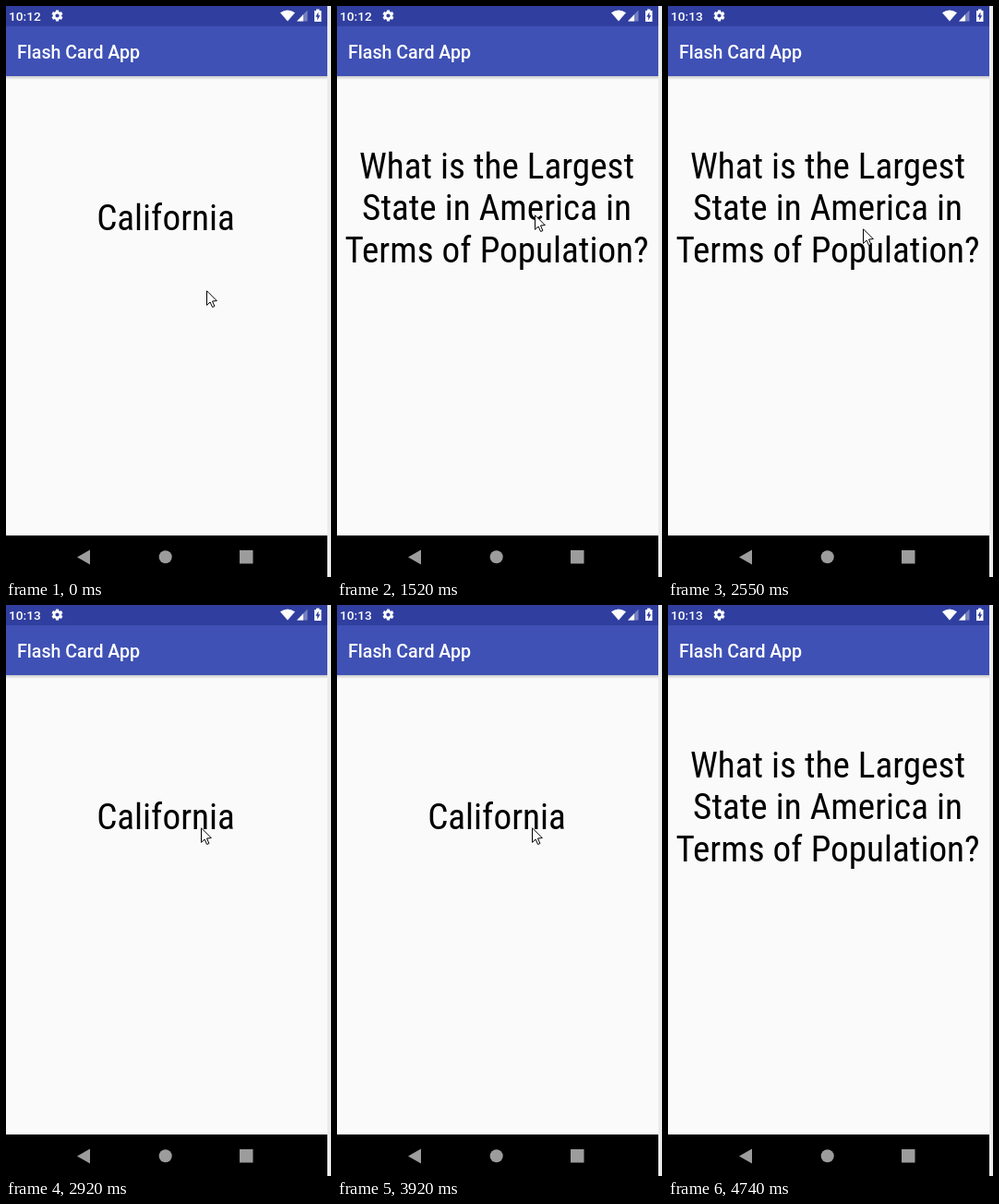
An HTML page with a canvas for the animation above (5150 ms loop, 352x619 px).

```html
<!DOCTYPE html>
<html lang="en">
<head>
<meta charset="utf-8">
<title>Flash cards</title>
<style>
  html, body { margin: 0; width: 100%; height: 100%; overflow: hidden; background: #fafafa; }
  canvas { display: block; width: 352px; height: 619px; }
</style>
</head>
<body>
<canvas id="stage" width="352" height="619"></canvas>
<script>
const ctx = document.getElementById('stage').getContext('2d');
const LOOP = 5150;
const MID = 173;
const FLIPS = [1520, 2100, 2550, 2920, 3170, 3420, 3700, 3920, 4100];
const CLOCK_TICK = 2120;
const QUESTION = ['What is the Largest', 'State in America in', 'Terms of Population?'];
const ANSWER = 'California';
const CARD_FONT = "39.2px 'Roboto Condensed', Roboto, sans-serif";

// Each move runs in equal hops; the first hop lands at `start`, the last at `end`.
const MOVES = [
  { start: 1090, end: 1300, hops: 9, from: [217, 308], bend: [226, 272], to: [214, 226] },
  { start: 1570, end: 1790, hops: 9, from: [214, 226], bend: [214, 234], to: [211, 240] },
  { start: 2300, end: 2300, hops: 1, from: [211, 240], bend: [211, 240], to: [211, 241] },
  { start: 4380, end: 4740, hops: 14, from: [211, 241], bend: [257, 445], to: [303, 650] }
];

function rect(color, x, y, w, h) {
  ctx.fillStyle = color;
  ctx.fillRect(x, y, w, h);
}

function poly(color, points) {
  ctx.fillStyle = color;
  ctx.beginPath();
  points.forEach(([x, y]) => ctx.lineTo(x, y));
  ctx.closePath();
  ctx.fill();
}

function disc(color, x, y, r) {
  ctx.fillStyle = color;
  ctx.beginPath();
  ctx.arc(x, y, r, 0, Math.PI * 2);
  ctx.fill();
}

function label(text, x, y, size) {
  ctx.font = `500 ${size}px Roboto, sans-serif`;
  ctx.textAlign = 'left';
  ctx.fillStyle = '#fff';
  ctx.fillText(text, x, y);
}

function setStretch(value) {
  if ('fontStretch' in ctx) ctx.fontStretch = value;
}

// Narrow the regular face only when no condensed face is available.
function findSqueeze() {
  ctx.font = '39.2px Roboto, sans-serif';
  const regular = ctx.measureText(ANSWER).width;
  setStretch('condensed');
  ctx.font = CARD_FONT;
  const narrow = ctx.measureText(ANSWER).width;
  setStretch('normal');
  return narrow / regular > 0.95 ? 0.875 : 1;
}
const squeeze = findSqueeze();

function cardLine(text, y) {
  ctx.save();
  setStretch('condensed');
  ctx.font = CARD_FONT;
  ctx.textAlign = 'center';
  ctx.fillStyle = '#000';
  ctx.translate(MID, y);
  ctx.scale(squeeze, 1);
  ctx.fillText(text, 0, 0);
  ctx.restore();
}

function gear(x, y) {
  ctx.save();
  ctx.translate(x, y);
  for (let i = 0; i < 6; i++) {
    rect('#fff', -1.6, -6, 3.2, 3);
    ctx.rotate(Math.PI / 3);
  }
  ctx.strokeStyle = '#fff';
  ctx.lineWidth = 2.6;
  ctx.beginPath();
  ctx.arc(0, 0, 3.4, 0, Math.PI * 2);
  ctx.stroke();
  ctx.restore();
}

function wifi() {
  ctx.fillStyle = '#fff';
  ctx.beginPath();
  ctx.moveTo(305, 16.5);
  ctx.lineTo(297, 7.2);
  ctx.quadraticCurveTo(305, 1.6, 313, 7.2);
  ctx.closePath();
  ctx.fill();
}

function statusBar(clock) {
  rect('#303f9f', 0, 0, 348, 22);
  label(clock, 3, 15.5, 13.7);
  gear(55.5, 10.5);
  wifi();
  poly('rgba(255,255,255,0.35)', [[315, 16.5], [326.5, 16.5], [326.5, 4.5]]);
  poly('#fff', [[315, 16.5], [322, 16.5], [322, 9.2]]);
  rect('#fff', 336, 3.5, 3.5, 2);
  rect('#fff', 334, 5, 7.5, 12);
  poly('#303f9f', [[338.4, 6.5], [335.3, 11.7], [337.2, 11.7], [337.2, 15.5], [340.2, 10.2], [338.4, 10.2]]);
}

function appBar() {
  rect('#3f51b5', 0, 22, 348, 54);
  const shade = ctx.createLinearGradient(0, 76, 0, 80);
  shade.addColorStop(0, 'rgba(0,0,0,0.2)');
  shade.addColorStop(1, 'rgba(0,0,0,0)');
  rect(shade, 0, 76, 348, 4);
  label('Flash Card App', 12, 57, 19.6);
}

function navBar() {
  rect('#000', 0, 574, 348, 45);
  poly('#9c9c9c', [[77, 597.5], [91, 589.5], [91, 605.5]]);
  disc('#9c9c9c', 172.7, 597.3, 7);
  rect('#9c9c9c', 253, 590, 14.5, 14.5);
}

function pointerAt(t) {
  let spot = MOVES[0].from;
  for (const m of MOVES) {
    if (t < m.start) break;
    const gap = (m.end - m.start) / Math.max(1, m.hops - 1);
    const hop = gap ? Math.min(m.hops, 1 + Math.floor((t - m.start) / gap + 1e-6)) : 1;
    const p = hop / m.hops;
    const s = p * p * (3 - 2 * p);
    spot = m.from.map((a, i) =>
      Math.round(a * (1 - s) ** 2 + 2 * m.bend[i] * s * (1 - s) + m.to[i] * s * s));
  }
  return spot;
}

function pointer([x, y]) {
  ctx.save();
  ctx.translate(x, y);
  ctx.lineWidth = 1;
  ctx.strokeStyle = '#000';
  poly('#fff', [[0.5, 0.8], [0.5, 16.4], [4.1, 13], [6.6, 18.5], [8.9, 17.5], [6.5, 12], [11.3, 11.6]]);
  ctx.stroke();
  ctx.restore();
}

function draw(t) {
  rect('#fafafa', 0, 0, 348, 619);
  rect('#ebebeb', 348, 0, 4, 619);
  appBar();
  statusBar(t < CLOCK_TICK ? '10:12' : '10:13');
  navBar();
  const flips = FLIPS.filter(f => t >= f).length;
  if (flips % 2) QUESTION.forEach((line, i) => cardLine(line, Math.floor(187 + 45.5 * i)));
  else cardLine(ANSWER, 243);
  pointer(pointerAt(t));
}

const began = performance.now();
function tick() {
  draw((performance.now() - began) % LOOP);
  requestAnimationFrame(tick);
}
tick();
</script>
</body>
</html>
```
